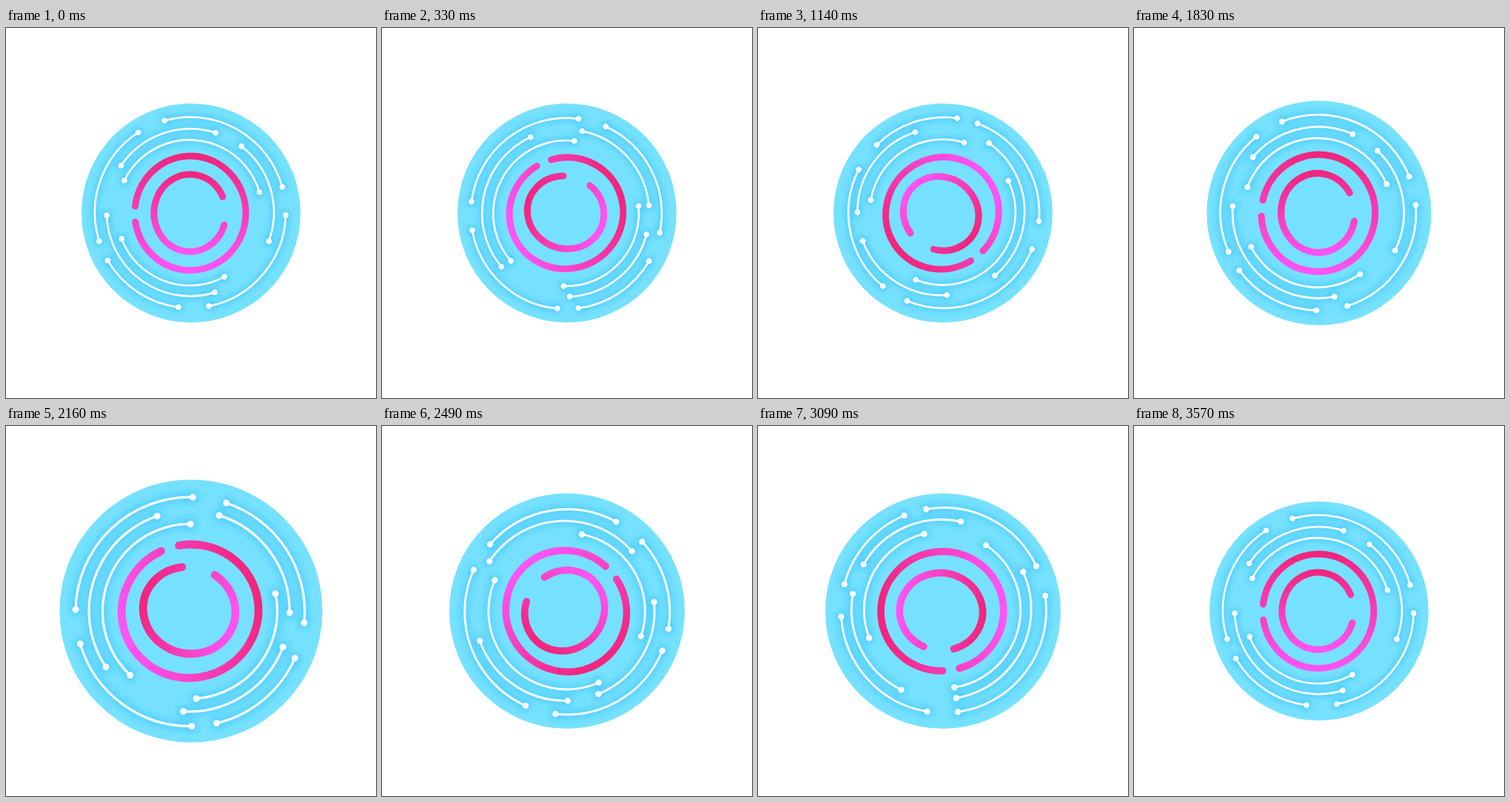
An HTML page with a canvas for the animation above (3600 ms loop, 500 px wide and 500 px high).

```html
<!DOCTYPE html>
<html lang="en">
<head>
<meta charset="utf-8">
<title>Pulsing rings</title>
<style>
  html, body { margin: 0; width: 100%; height: 100%; overflow: hidden; background: #fff; }
  canvas { display: block; width: 500px; height: 500px; }
</style>
</head>
<body>
<canvas id="stage" width="500" height="500"></canvas>
<script>
const SIZE = 500, MID = 250, STEP = 30, TURN_STEPS = 60;
const ctx = document.getElementById('stage').getContext('2d');
const layer = document.createElement('canvas');
layer.width = layer.height = SIZE;
const pen = layer.getContext('2d');
const rad = deg => deg * Math.PI / 180;

// Arc angles are clockwise degrees from twelve o'clock.
const circuits = [
  { center: [249, 249.3], pivot: [250, 250], r: 129, dir: -1,
    arcs: [[-15.7, 74.5], [91.6, 168.8], [187.1, 239.8], [252.5, 326.9]] },
  { center: [249, 249.3], pivot: [247.9, 249.1], r: 113, dir: 1,
    arcs: [[-55.8, 17.6], [37.7, 110.1], [163, 268.1]] },
  { center: [248.1, 249.6], pivot: [249, 249.6], r: 98.4, dir: -1,
    arcs: [[-63.7, 73.6], [151.5, 249]] }
];

// Ring angles are ellipse parameters from three o'clock.
const rings = [
  { center: [249, 250.2], pivot: [249, 250.2], rx: 75, ry: 77.2, dir: 1, from: 186.9, to: 531.2 },
  { center: [248.7, 250], pivot: [247.8, 250], rx: 48.7, ry: 52.2, dir: -1, from: 17.8, to: 335.2 }
];

function spin(c, [x, y], angle) {
  c.translate(x, y);
  c.rotate(angle);
  c.translate(-x, -y);
}

function zoom(c, scale) {
  c.translate(MID, MID);
  c.scale(scale, scale);
  c.translate(-MID, -MID);
}

function drawCircuit({ center: [x, y], pivot, r, dir, arcs }, turn, scale) {
  pen.clearRect(0, 0, SIZE, SIZE);
  pen.save();
  zoom(pen, scale);
  spin(pen, pivot, dir * turn);
  pen.strokeStyle = pen.fillStyle = '#fff';
  pen.lineWidth = 2.7;
  for (const arc of arcs) {
    const ends = arc.map(a => rad(a - 90));
    pen.beginPath();
    pen.arc(x, y, r, ...ends);
    pen.stroke();
    for (const a of ends) {
      pen.beginPath();
      pen.arc(x + r * Math.cos(a), y + r * Math.sin(a), 3.8, 0, 2 * Math.PI);
      pen.fill();
    }
  }
  pen.restore();

  ctx.save();
  ctx.shadowColor = '#00a8ff';
  ctx.shadowBlur = 10 * scale;
  ctx.drawImage(layer, 0, 0);
  ctx.restore();
}

function drawRing({ center: [x, y], pivot, rx, ry, dir, from, to }, turn, scale) {
  const shade = ctx.createLinearGradient(0, y - ry - 4.5, 0, y + ry + 4.5);
  shade.addColorStop(0, '#f1247a');
  shade.addColorStop(1, '#ff55f8');
  ctx.save();
  zoom(ctx, scale);
  spin(ctx, pivot, dir * turn);
  ctx.strokeStyle = shade;
  ctx.lineWidth = 9;
  ctx.lineCap = 'round';
  ctx.beginPath();
  ctx.ellipse(x, y, rx, ry, 0, rad(from), rad(to));
  ctx.stroke();
  ctx.restore();
}

// Three linear beats up to 1.25; the last one closes on the final step.
function pulse(step) {
  if (step === TURN_STEPS - 1) return 1;
  if (step > 50) return 1.25 - 0.25 * (step - 50) / 9;
  return 1 + 0.25 * (1 - Math.abs(step % 20 - 10) / 10);
}

function draw(time) {
  const tick = Math.floor(time / STEP) % (2 * TURN_STEPS);
  const step = tick % TURN_STEPS;
  const turn = 2 * Math.PI * step / (TURN_STEPS - 1);
  const scale = tick < TURN_STEPS ? 1 : pulse(step);

  ctx.fillStyle = '#fff';
  ctx.fillRect(0, 0, SIZE, SIZE);
  ctx.fillStyle = '#76e1ff';
  ctx.beginPath();
  ctx.arc(MID, MID, 148 * scale, 0, 2 * Math.PI);
  ctx.fill();
  circuits.forEach(c => drawCircuit(c, turn, scale));
  rings.forEach(r => drawRing(r, turn, scale));
}

const start = performance.now();
function loop(now) {
  draw(Math.max(0, now - start));
  requestAnimationFrame(loop);
}
draw(0);
requestAnimationFrame(loop);
</script>
</body>
</html>
```
